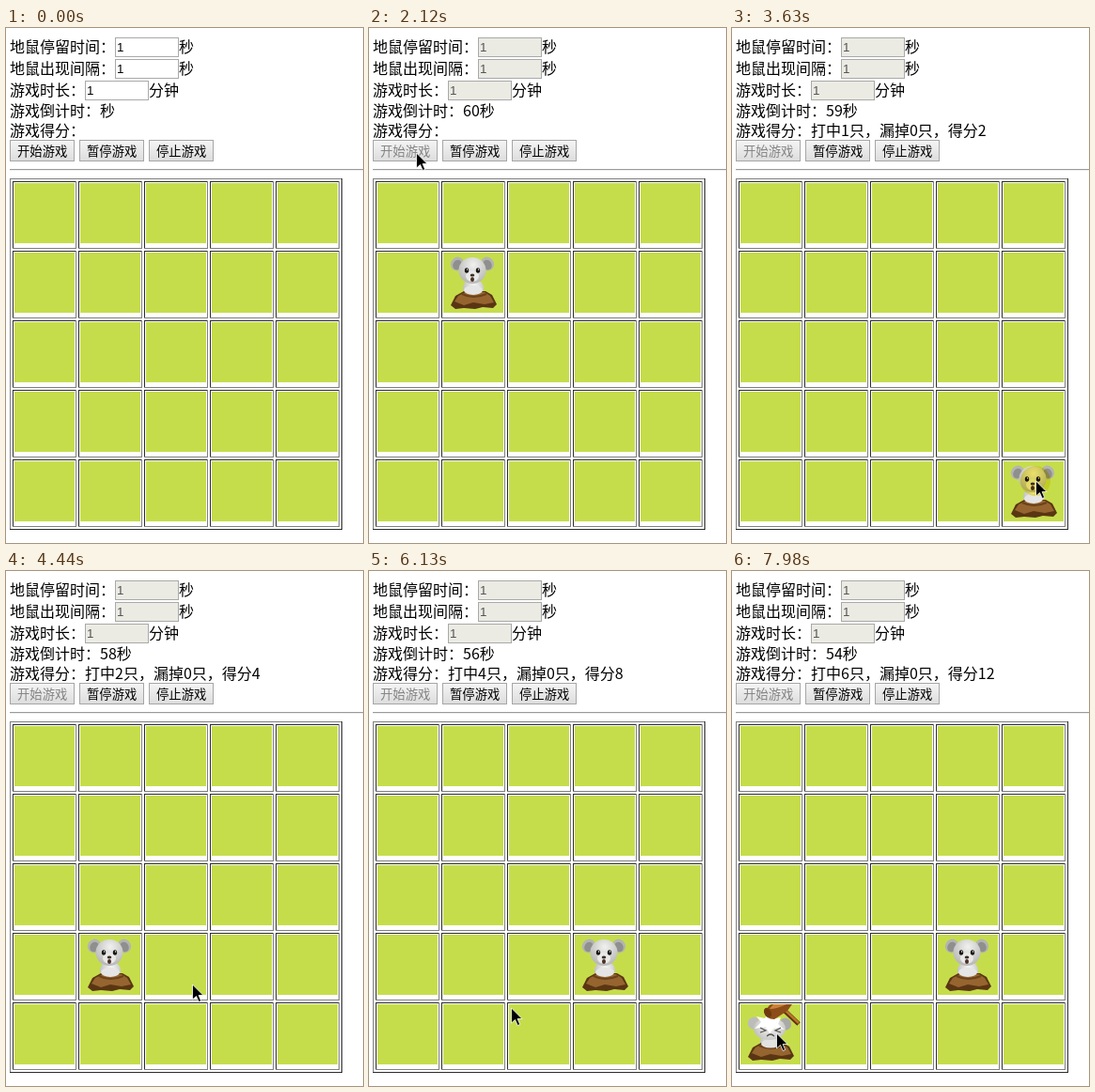
These frames come from a looping animation (380 px wide and 548 px high, 8000 ms). An HTML page with a canvas:

```html
<!DOCTYPE html>
<html lang="zh-CN">
<head>
<meta charset="utf-8">
<title>打地鼠</title>
<style>
html, body { margin: 0; width: 100%; height: 100%; overflow: hidden; background: #fff; }
canvas { display: block; }
</style>
</head>
<body>
<canvas id="stage" width="380" height="548"></canvas>
<script>
const ctx = document.getElementById('stage').getContext('2d');
const LOOP = 8000, START = 1870, HIT_HOLD = 540;
const CJK = '"Noto Sans CJK SC", "Noto Sans CJK", "Noto Sans CJK JP", sans-serif';
const LATIN = '"Liberation Sans", Arial, sans-serif';

// Each mole appears on a countdown tick.
const moles = [
  { col: 1, row: 1, show: 1870, hit: 2720 },
  { col: 4, row: 4, show: 2900, hit: 3750 },
  { col: 1, row: 3, show: 3930, hit: 4720 },
  { col: 1, row: 4, show: 4950, hit: 5590 },
  { col: 3, row: 3, show: 5950, hit: 6600 },
  { col: 0, row: 4, show: 6960, hit: 7730 },
  { col: 3, row: 3, show: 7980, hit: Infinity }
];

// Pointer path: time, x, y
const path = [
  [210, 290, 448], [450, 284, 330], [700, 268, 210], [990, 281, 112],
  [1310, 128, 129], [1550, 50, 133], [2120, 50, 133], [2500, 112, 262],
  [2720, 112, 264], [2970, 140, 290], [3570, 323, 482], [4180, 323, 482],
  [4620, 112, 412], [5230, 112, 412], [5330, 110, 486], [6000, 110, 486],
  [6500, 265, 405], [7140, 265, 405], [7600, 47, 492], [LOOP, 47, 492]
];

function pointerAt(t) {
  if (t < path[0][0]) return null;
  const i = path.findIndex(key => key[0] > t);
  const [t0, x0, y0] = path[i - 1], [t1, x1, y1] = path[i];
  const k = (t - t0) / (t1 - t0);
  return { x: Math.round(x0 + (x1 - x0) * k), y: Math.round(y0 + (y1 - y0) * k) };
}

function isPressed(t) {
  return (t >= 1800 && t < START) || moles.some(m => t >= m.hit - 120 && t < m.hit);
}

function rect(x, y, w, h, color) {
  ctx.fillStyle = color;
  ctx.fillRect(x, y, w, h);
}

function frame(x, y, w, h, topLeft, bottomRight = topLeft) {
  rect(x, y, w, 1, topLeft);
  rect(x, y, 1, h, topLeft);
  rect(x, y + h - 1, w, 1, bottomRight);
  rect(x + w - 1, y, 1, h, bottomRight);
}

function text(str, x, y, size = 16, color = '#000', family = CJK) {
  ctx.font = `${size}px ${family}`;
  ctx.fillStyle = color;
  ctx.fillText(str, x, y);
}

function oval(x, y, rx, ry, fill, turn = 0) {
  ctx.beginPath();
  ctx.ellipse(x, y, rx, ry, turn, 0, 7);
  ctx.fillStyle = fill;
  ctx.fill();
}

function shape(d, fill, stroke, width = 1) {
  const p = new Path2D(d);
  if (fill) { ctx.fillStyle = fill; ctx.fill(p); }
  if (stroke) { ctx.strokeStyle = stroke; ctx.lineWidth = width; ctx.stroke(p); }
}

function shade(x, y, r, light, dark) {
  const g = ctx.createRadialGradient(x, y, 1, x, y, r);
  g.addColorStop(0, light);
  g.addColorStop(1, dark);
  return g;
}

function input(x, y, disabled) {
  rect(x, y, 68, 21, disabled ? '#ebebe4' : '#fff');
  frame(x, y, 68, 21, '#a9a9a9');
  text('1', x + 2, y + 15, 13.33, disabled ? '#545454' : '#000', LATIN);
}

function button(label, x, pointer, pressed, disabled) {
  const y = 119, w = 69, h = 23;
  const over = pointer && pointer.x >= x && pointer.x < x + w && pointer.y >= y && pointer.y < y + h;
  const g = ctx.createLinearGradient(0, y, 0, y + h);
  const down = over && pressed;
  g.addColorStop(0, down ? '#dcdcdc' : '#f5f5f5');
  g.addColorStop(1, down ? '#f0f0f0' : '#dcdcdc');
  rect(x, y, w, h, g);
  frame(x, y, w, h, over && !disabled ? '#666' : '#a6a6a6');
  text(label, x + 8, y + 17, 13.33, disabled ? '#838383' : '#000');
}

function mound() {
  shape('M8 56L13 46L22 41H45L52 45L57 55L53 59L42 58L34 60L22 59L13 60Z', '#5a3513');
  shape('M12 52L16 46L24 42H44L50 46L54 53L44 55L32 53L22 56Z', '#96652f');
  shape('M20 44Q32 50 46 44', null, '#6b421b', 2);
}

function calmMole() {
  for (const [x, tilt] of [[15, 0.5], [47, -0.5]]) {
    oval(x, 12, 7, 7.5, '#b4b4b2', tilt);
    oval(x, 13, 4.5, 5.5, '#8f8f8d', tilt);
  }
  oval(32, 38, 11, 10, shade(33, 36, 13, '#f5f5f5', '#bcbcbc'));
  mound();
  oval(32, 40, 10, 5, '#e5e5e5');
  oval(31, 19, 14.5, 14, shade(32, 13, 19, '#eeeeec', '#b9b9b7'));
  oval(31, 25, 7, 6, '#e9e9e7');
  for (const x of [25, 37]) {
    oval(x, 19, 2.2, 2.8, '#191514');
    oval(x + 0.6, 18, 0.7, 0.8, '#fff');
  }
  oval(31, 24, 2.3, 1.6, '#3a2d28');
  oval(31, 28.5, 2, 2.5, '#4b2f28');
}

function struckMole() {
  oval(14, 20, 6, 6.5, '#bcbcba', 0.5);
  oval(48, 21, 6, 6.5, '#aaaaa8', -0.5);
  oval(32, 40, 11, 9, shade(33, 38, 13, '#f5f5f5', '#bcbcbc'));
  mound();
  oval(32, 42, 10, 4.5, '#e2e2e0');
  oval(31, 26, 17, 12, shade(32, 22, 20, '#fafafa', '#bdbdbb'));
  shape('M30 10L35 16L43 14L40 21L47 27L36 25L31 31L27 24L15 26L22 19L17 13L26 15Z', '#fff');
  shape('M21 25L27 28L21 30M43 25L37 28L43 30M28 34Q32 30 36 34', null, '#55504b', 1.2);
  shape('M44 4L62 21', null, '#5e300d', 5);
  shape('M44 3L62 20', null, '#b8752d', 2.5);
  shape('M25 8L31 1L33 0H55L50 7L36 16Q27 16 25 8Z', '#8d4d18');
  shape('M31 5Q39 5 49 0H35Z', '#c9843a');
  oval(29, 9, 3.5, 5.5, '#6f3910', -0.5);
}

function board() {
  frame(4, 160, 354, 374, '#808080', '#2c2c2c');
  for (let row = 0; row < 5; row++) {
    for (let col = 0; col < 5; col++) {
      const x = 7 + col * 70, y = 163 + row * 74;
      frame(x, y, 68, 72, '#2c2c2c', '#808080');
      rect(x + 2, y + 2, 64, 64, '#c6dd4b');
    }
  }
}

function drawMole(mole, t) {
  if (t < mole.show || t >= mole.hit + HIT_HOLD) return;
  ctx.save();
  ctx.translate(9 + mole.col * 70, 165 + mole.row * 74);
  ctx.beginPath();
  ctx.rect(0, 0, 64, 64);
  ctx.clip();
  t < mole.hit ? calmMole() : struckMole();
  ctx.restore();
}

function drawPointer({ x, y }, pressed) {
  ctx.save();
  if (pressed) {
    ctx.globalCompositeOperation = 'multiply';
    oval(x, y, 16, 16, 'rgba(246,232,70,.75)');
    ctx.globalCompositeOperation = 'source-over';
  }
  ctx.translate(x + 0.5, y);
  shape('M0 0V16L4 12.5L6.7 18.5L9.2 17.5L6.6 11.5H11.5Z', '#000', '#fff', 0.8);
  ctx.restore();
}

function draw(t) {
  const running = t >= START;
  const pointer = pointerAt(t), pressed = isPressed(t);
  const seconds = running ? 61 - moles.filter(m => t >= m.show).length : '';
  const hits = moles.filter(m => t >= m.hit).length;

  rect(0, 0, 380, 548, '#fff');
  text('地鼠停留时间：', 4, 26);
  text('秒', 184, 26);
  text('地鼠出现间隔：', 4, 49);
  text('秒', 184, 49);
  text('游戏时长：', 4, 72);
  text('分钟', 152, 72);
  text(`游戏倒计时：${seconds}秒`, 4, 94);
  text('游戏得分：' + (hits ? `打中${hits}只，漏掉0只，得分${hits * 2}` : ''), 4, 115);
  input(116, 10, running);
  input(116, 33, running);
  input(84, 56, running);
  button('开始游戏', 4, pointer, pressed, running);
  button('暂停游戏', 78, pointer, pressed, false);
  button('停止游戏', 152, pointer, pressed, false);
  rect(4, 150, 376, 1, '#9a9a9a');
  rect(4, 151, 376, 1, '#eee');
  board();
  moles.forEach(m => drawMole(m, t));
  if (pointer) drawPointer(pointer, pressed);
}

function tick() {
  draw(performance.now() % LOOP);
  requestAnimationFrame(tick);
}
tick();
</script>
</body>
</html>
```
